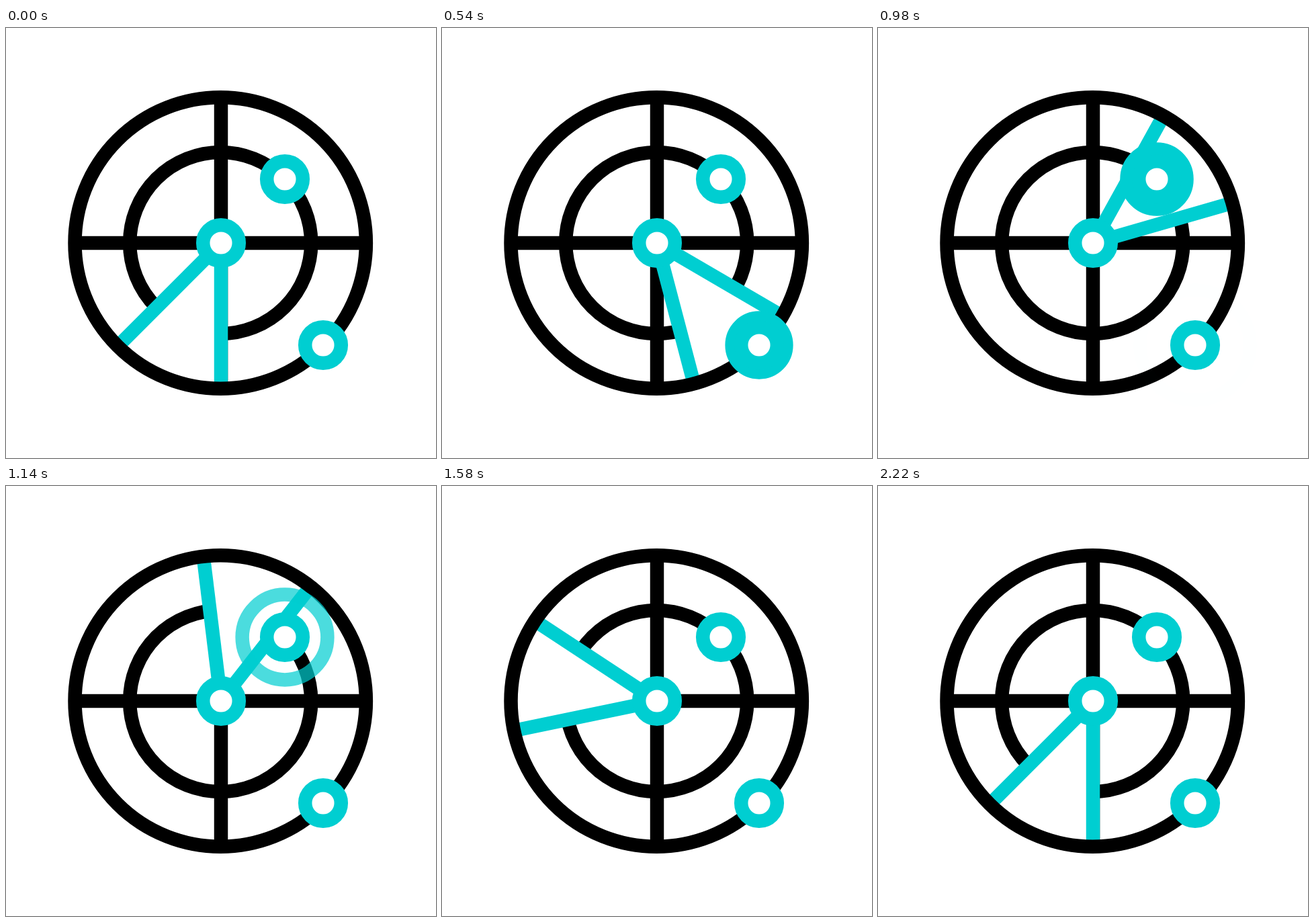
Recreate the animation shown at these times as an HTML page with a canvas. Size 640x640 px, loop 2.4 s.

```html
<!DOCTYPE html>
<html lang="en">
<head>
<meta charset="utf-8">
<title>Radar</title>
<style>
  html, body { margin: 0; height: 100%; overflow: hidden; background: #fff; }
  canvas { display: block; }
</style>
</head>
<body>
<canvas id="stage" width="640" height="640"></canvas>
<script>
const ctx = document.getElementById('stage').getContext('2d');
const TEAL = '#00ced1', LOOP = 2400, TURN = 2220, PULSE = 640;
const CENTER = 320, REACH = 212, NODE_RADIUS = 26.8, PULSE_RADIUS = 82;
const targets = [
  { x: 472, y: 472, start: 342 },
  { x: 415, y: 225, start: 745 },
];

const clamp = v => Math.min(1, Math.max(0, v));

// cubic-bezier(.28, 0, .72, 1), solved by bisection
function ease(x) {
  let low = 0, high = 1;
  for (let i = 0; i < 24; i++) {
    const s = (low + high) / 2, r = 1 - s;
    if (3 * s * r * (0.28 * r + 0.72 * s) + s ** 3 < x) low = s; else high = s;
  }
  return low * low * (3 - 2 * low);
}

function ring(x, y, radius, color, fill) {
  ctx.beginPath();
  ctx.arc(x, y, radius, 0, 2 * Math.PI);
  if (fill) {
    ctx.fillStyle = fill;
    ctx.fill();
  }
  ctx.strokeStyle = color;
  ctx.stroke();
}

function line(x1, y1, x2, y2, color) {
  ctx.beginPath();
  ctx.moveTo(x1, y1);
  ctx.lineTo(x2, y2);
  ctx.strokeStyle = color;
  ctx.stroke();
}

function sweep(lead) {
  const trail = lead + Math.PI / 4;
  ctx.beginPath();
  ctx.moveTo(CENTER, CENTER);
  ctx.arc(CENTER, CENTER, REACH, lead, trail);
  ctx.fillStyle = '#fff';
  ctx.fill();
  for (const angle of [lead, trail]) {
    line(CENTER, CENTER, CENTER + REACH * Math.cos(angle), CENTER + REACH * Math.sin(angle), TEAL);
  }
}

function pulse({ x, y, start }, time) {
  const progress = (time - start) / PULSE;
  if (progress <= 0 || progress >= 1) return;
  ctx.globalAlpha = clamp((1 - progress) / 0.54);
  ring(x, y, NODE_RADIUS + (PULSE_RADIUS - NODE_RADIUS) * ease(progress), TEAL);
  ctx.globalAlpha = 1;
}

function draw(time) {
  ctx.fillStyle = '#fff';
  ctx.fillRect(0, 0, 640, 640);
  ctx.lineWidth = 20.5;
  line(CENTER, 104, CENTER, 536, '#000');
  line(104, CENTER, 536, CENTER, '#000');
  ring(319.2, CENTER, 135, '#000');
  sweep(Math.PI / 2 - 2 * Math.PI * ease(clamp(time / TURN)));
  ring(319.2, CENTER, 216.7, '#000');
  for (const target of targets) pulse(target, time);
  for (const { x, y } of [...targets, { x: CENTER, y: CENTER }]) {
    ring(x, y, NODE_RADIUS, TEAL, '#fff');
  }
}

function frame() {
  draw(performance.now() % LOOP);
  requestAnimationFrame(frame);
}
frame();
</script>
</body>
</html>
```
